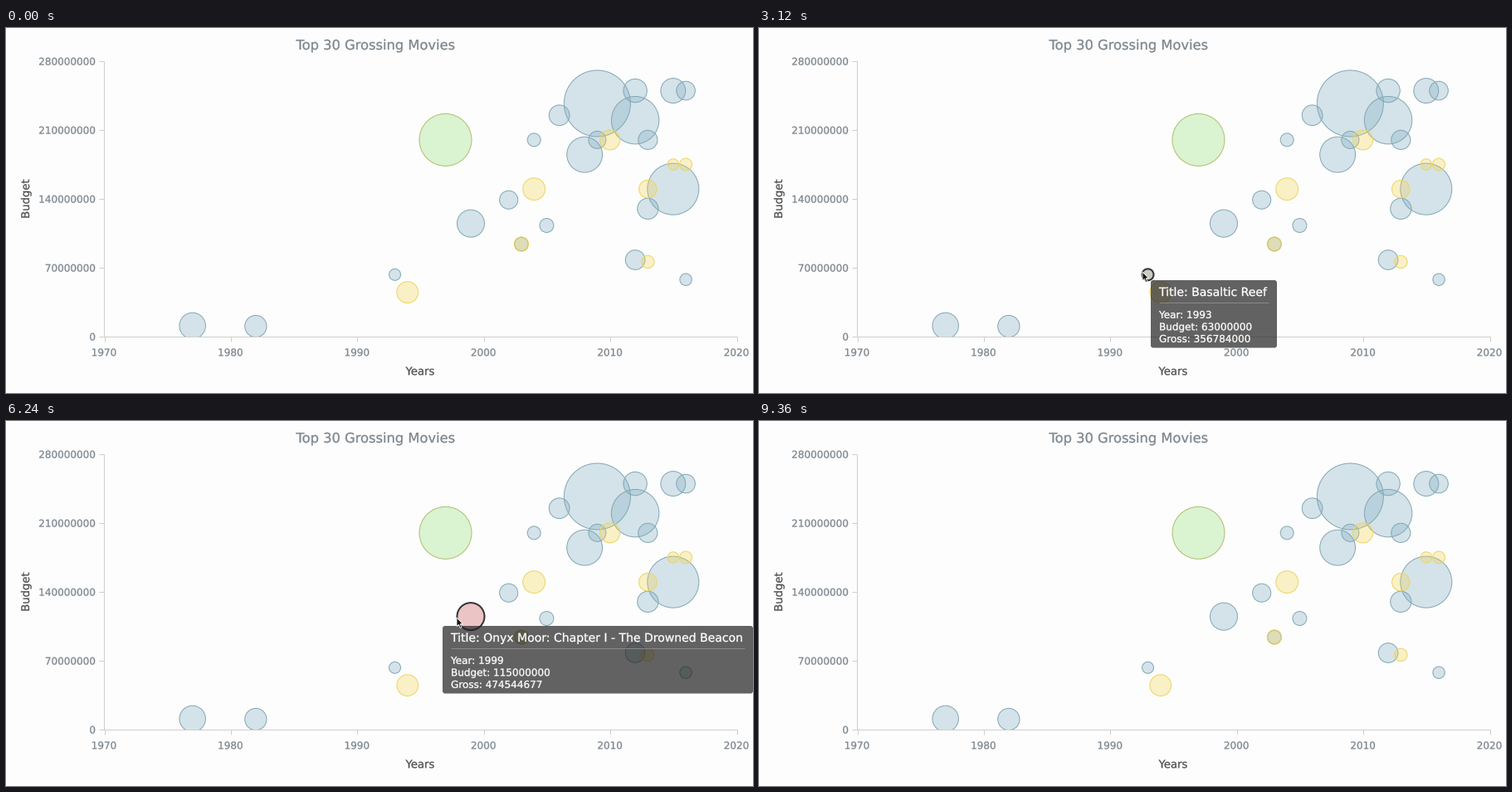
Animation of 900x440 px, one loop 9490 ms. Source, as a matplotlib script:

```python
import math

import matplotlib.pyplot as plt
import numpy as np
from matplotlib.animation import FuncAnimation
from matplotlib.colors import to_rgba
from matplotlib.patches import Circle, FancyBboxPatch, Polygon, Rectangle
from matplotlib.patheffects import Stroke
from matplotlib.transforms import Affine2D

W, H, DPI = 900, 440, 100
PX = 72 / DPI  # points per pixel
FRAMES, STEP = 73, 130
LEFT, RIGHT, TOP, BOTTOM = 118, 880, 40, 372
GREY, DARK, LINE = "#7c868e", "#4d4f52", "#cecece"

plt.rcParams["font.family"] = "DejaVu Sans"
plt.rcParams["text.hinting"] = "none"

fig = plt.figure(figsize=(W / DPI, H / DPI), dpi=DPI, facecolor="#fdfdfd")
ax = fig.add_axes([0, 0, 1, 1])
ax.set_xlim(0, W)
ax.set_ylim(H, 0)
ax.axis("off")


def label(x, y, text, size, color, ha="center", **kw):
    # A hairline stroke gives the glyphs a slightly heavier weight.
    return ax.text(x, y, text, fontsize=size * PX, color=color, ha=ha,
                   va="baseline", **kw,
                   path_effects=[Stroke(linewidth=.2, foreground=color)])


def line(xs, ys, color=LINE, **kw):
    return ax.plot(xs, ys, color=color, lw=PX, solid_capstyle="butt", **kw)[0]


def year_x(year):
    return LEFT + (year - 1970) * (RIGHT - LEFT) / 50


def budget_y(millions):
    return BOTTOM - millions * (BOTTOM - TOP) / 280


def draw_axes():
    line([LEFT - .5] * 2, [TOP, BOTTOM])
    line([LEFT, RIGHT + 1], [BOTTOM + .5] * 2)
    for year in range(1970, 2021, 10):
        x = year_x(year)
        line([x + .5] * 2, [BOTTOM, BOTTOM + 6])
        label(x, 395.3, str(year), 12, GREY)
    for millions in range(0, 281, 70):
        y = budget_y(millions)
        line([LEFT - 6, LEFT], [y + .5] * 2)
        label(108, y + 4.6, str(millions * 10**6), 12, GREY, "right")
    label(445, 26, "Top 30 Grossing Movies", 16.3, GREY)
    label(499, 418.2, "Years", 13.2, DARK)
    label(28, 206, "Budget", 13.2, DARK, rotation=90, rotation_mode="anchor")


# Year and budget in millions, from highest to lowest gross
FILMS = [
    (2009, 237), (1997, 200), (2015, 150), (2012, 220), (2008, 185),
    (1999, 115), (1977, 11), (2015, 250), (2012, 250), (2004, 150),
    (1982, 10.5), (1994, 45), (2013, 130), (2006, 225), (2010, 200),
    (2012, 78), (2013, 200), (2016, 250), (2002, 139), (2013, 150),
    (2009, 200), (2003, 94), (2005, 113), (2003, 94), (2004, 200),
    (2013, 76), (2016, 175), (2016, 58), (1993, 63), (2015, 175)]
YELLOW_RANKS = {10, 12, 15, 20, 22, 26, 27, 30}
GREEN_RANKS = {2}

# Year and budget of a bubble: title, gross, hover fill
DETAILS = {
    (1993, 63): ("Basaltic Reef", 356784000, "#cbcbc2"),
    (1999, 115): ("Onyx Moor: Chapter I - The Drowned Beacon", 474544677,
                  "#ebc4c5"),
}


def radius(rank):
    return np.interp(rank, [1, 2, 3, 4, 5, 6, 10, 21, 22, 30],
                     [40, 31.5, 31, 28.7, 21.4, 16.5, 13.4, 10.5, 8.7, 6.7])


def series(rank):
    """Fill, stroke and stacking order."""
    if rank in GREEN_RANKS:
        return "#8cdc6e", "#b0bf70", 5
    if rank in YELLOW_RANKS:
        return "#f6d246", "#ecd564", 4
    return "#78aabe", "#83a7b5", 3


def draw_bubbles():
    hoverable = {}
    for rank, (year, millions) in enumerate(FILMS, 1):
        fill, stroke, order = series(rank)
        style = dict(facecolor=to_rgba(fill, .3), edgecolor=stroke,
                     linewidth=PX)
        bubble = Circle((year_x(year), budget_y(millions)), radius(rank),
                        zorder=order, **style)
        ax.add_patch(bubble)
        bubble.set_clip_path(Rectangle((LEFT, 0), W, BOTTOM + .5,
                                       transform=ax.transData))
        if (year, millions) in DETAILS:
            hoverable[year, millions] = bubble, style
    return hoverable


class Tooltip:
    def __init__(self):
        self.shift = Affine2D()
        kw = dict(transform=self.shift + ax.transData, zorder=6)
        self.box = FancyBboxPatch(
            (0, 0), 100, 81.5, boxstyle="round,pad=0,rounding_size=3",
            facecolor=to_rgba("#212121", .7), linewidth=0, **kw)
        ax.add_patch(self.box)
        self.rule = line([10, 90], [27.5, 27.5], "#8a888a", **kw)
        self.title = label(10, 19, "", 14, "white", "left", **kw)
        self.rows = [label(10, 45.8 + 14.5 * i, "", 12, "white", "left", **kw)
                     for i in range(3)]
        self.parts = [self.box, self.rule, self.title, *self.rows]

    def hide(self):
        for part in self.parts:
            part.set_visible(False)

    def show(self, key, x, y):
        name, gross, _ = DETAILS[key]
        year, millions = key
        texts = (f"Title: {name}", f"Year: {year}",
                 f"Budget: {millions * 10**6}", f"Gross: {gross}")
        for part, text in zip([self.title, *self.rows], texts):
            part.set_text(text)
        for part in self.parts:
            part.set_visible(True)
        width = round(self.title.get_window_extent().width) + 22
        self.box.set_width(width)
        self.rule.set_xdata([10, width - 10])
        self.shift.clear().translate(min(x + 10, W - width), y + 10)


# Pointer key points: time in ms, x, y
PATH = np.array([
    (520, 452, 414), (1300, 468, 294), (3120, 462, 294), (4550, 462, 294),
    (4940, 529, 232), (5330, 543, 237), (6240, 543, 237), (7930, 573, 304)])
LEAVE = 9230
ARROW = [(0, 0), (0, 10.6), (2.4, 8.4), (4.2, 12.6), (6, 11.8), (4.2, 7.8),
         (7.4, 7.6)]

draw_axes()
bubbles = draw_bubbles()
tooltip = Tooltip()
arrow_shift = Affine2D()
arrow = Polygon(ARROW, facecolor="#151515", edgecolor="white",
                linewidth=.8 * PX, transform=arrow_shift + ax.transData,
                zorder=8)
ax.add_patch(arrow)


def update(i):
    t = i * STEP
    times, xs, ys = PATH.T
    x, y = round(np.interp(t, times, xs)), round(np.interp(t, times, ys))
    active = times[0] <= t <= LEAVE
    arrow.set_visible(active)
    arrow_shift.clear().translate(x, y)
    tooltip.hide()
    for key, (bubble, style) in bubbles.items():
        cx, cy = bubble.center
        if active and math.hypot(x - cx, y - cy) < bubble.radius + 1:
            bubble.set(facecolor=DETAILS[key][2], edgecolor="#343234",
                       linewidth=2 * PX)
            tooltip.show(key, x, y)
        else:
            bubble.set(**style)
    return []


anim = FuncAnimation(fig, update, frames=FRAMES, interval=STEP, repeat=True,
                     repeat_delay=0, blit=False)
plt.show()
```
